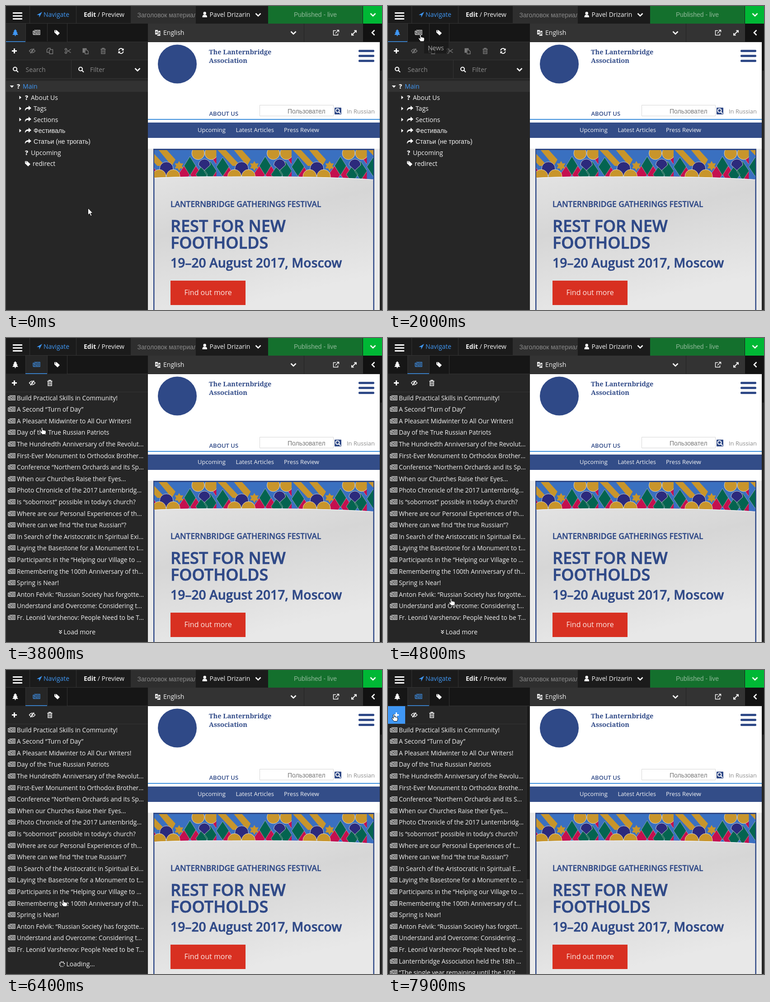
Write an HTML page that moves like this. It is 832 px wide and 673 px high and loops after 8000 ms.

```html
<!DOCTYPE html>
<html lang="en">
<head>
<meta charset="utf-8">
<title>Site editor</title>
<style>
html, body { margin: 0; width: 100%; height: 100%; overflow: hidden; background: #262626; }
svg { display: block; }
#stage, #over { position: absolute; left: 0; top: 0; }
text, #list { font: 14px 'Open Sans', sans-serif; }
text { fill: #f4f4f4; white-space: pre; }
.ar { font-family: 'Liberation Sans', Arial, sans-serif; }
.s13 { font-size: 13px; }
.navy { fill: #2f4987; }
.b { font-weight: 600; }
.q { font-weight: 800; }
.serif { font: 700 14.5px 'Noto Serif', serif; }
.head { font-weight: 600; stroke: #2f4987; stroke-width: .022em; }
.dim { fill: #8a8a8a; }
.blue { fill: #3f97f5; }
.w { color: #fff; }
.off { color: #7d7d7d; }
.on { color: #3f97f5; }
.ln { fill: none; stroke: currentColor; stroke-width: 1.4; }
.fl { fill: currentColor; }

#list { position: absolute; left: 0; top: 119.7px; width: 307px; height: 553.3px; margin: 0; padding: 0;
  overflow: hidden; list-style: none; color: #f4f4f4; font-size: 13.76px; line-height: 25.6px; }
#list li { position: relative; height: 25.6px; padding-left: 24px; overflow: hidden; white-space: nowrap; text-overflow: ellipsis; }
#list svg { position: absolute; left: 4px; top: 6px; color: #fff; }

.tree, .load, #list, .more, .hover, .load2, .rest, .plus, .news, .arrow, .hand, #cur, .tip {
  animation: 8s step-end infinite; }
.tree { animation-name: tree; }
.news { animation-name: news; }
.load { animation-name: load; }
#list { animation-name: list; }
.more { animation-name: more; }
.hover { animation-name: hover; }
.load2 { animation-name: load2; }
.rest { animation-name: rest; }
.plus { animation-name: plus; }
.arrow { animation-name: arrow; }
.hand { animation-name: hand; }
.tip { animation-name: tip; }
#cur { animation-name: move; }
.spin { animation: spin 2s steps(20) infinite; }

@keyframes tree { 0% { visibility: visible } 28.75%, 100% { visibility: hidden } }
@keyframes news { 0% { visibility: hidden } 28.75%, 100% { visibility: visible } }
@keyframes load { 0% { visibility: hidden } 28.75% { visibility: visible } 41.25%, 100% { visibility: hidden } }
@keyframes list { 0% { visibility: hidden; width: 307px } 41.25% { visibility: visible; width: 307px }
  81.25%, 100% { visibility: visible; width: 300px } }
@keyframes more { 0% { visibility: hidden } 41.25% { visibility: visible } 71.25%, 100% { visibility: hidden } }
@keyframes hover { 0% { visibility: hidden } 65% { visibility: visible } 71.25%, 100% { visibility: hidden } }
@keyframes load2 { 0% { visibility: hidden } 71.25% { visibility: visible } 81.25%, 100% { visibility: hidden } }
@keyframes rest { 0% { visibility: hidden } 81.25%, 100% { visibility: visible } }
@keyframes plus { 0% { visibility: hidden } 98.75%, 100% { visibility: visible } }
@keyframes arrow { 0% { visibility: visible } 16.25%, 100% { visibility: hidden } }
@keyframes hand { 0% { visibility: hidden } 16.25%, 100% { visibility: visible } }
@keyframes tip {
  0% { opacity: 0 }
  21.25% { opacity: 0; animation-timing-function: steps(5) }
  27.5% { opacity: 1 }
  28.75%, 100% { opacity: 0 } }
@keyframes move {
  0% { transform: translate(181px, 447px); animation-timing-function: steps(5) }
  6.25% { transform: translate(21px, 160px) }
  8.75% { transform: translate(21px, 160px); animation-timing-function: steps(4) }
  13.75% { transform: translate(14px, 112px); animation-timing-function: steps(5) }
  20% { transform: translate(59px, 63px); animation-timing-function: steps(3) }
  23.75% { transform: translate(67px, 62px) }
  32.5% { transform: translate(64px, 62px) }
  42.5% { transform: translate(64px, 64px); animation-timing-function: steps(2) }
  45% { transform: translate(52px, 112px); animation-timing-function: steps(2) }
  47.5% { transform: translate(75px, 197px); animation-timing-function: steps(2) }
  50% { transform: translate(89px, 333px) }
  52.5% { transform: translate(89px, 333px); animation-timing-function: steps(4) }
  57.5% { transform: translate(134px, 561px) }
  58.75% { transform: translate(134px, 561px); animation-timing-function: steps(6) }
  66.25% { transform: translate(138px, 649px) }
  68.75% { transform: translate(137px, 648px) }
  72.5% { transform: translate(137px, 648px); animation-timing-function: steps(5) }
  78.75% { transform: translate(122px, 507px) }
  88.75% { transform: translate(122px, 507px); animation-timing-function: steps(3) }
  92.5% { transform: translate(71px, 211px) }
  95% { transform: translate(71px, 211px); animation-timing-function: steps(3) }
  98.75%, 100% { transform: translate(8px, 97px) } }
@keyframes spin { to { transform: rotate(360deg) } }
</style>
</head>
<body>
<svg id="stage" width="832" height="673">
<defs>
  <linearGradient id="paper" x1="0" y1="0" x2=".3" y2="1">
    <stop offset="0" stop-color="#e8e8e8"/><stop offset=".5" stop-color="#d6d6d6"/><stop offset="1" stop-color="#e8e8e8"/>
  </linearGradient>
  <clipPath id="band"><path d="M328 319H813V384Q700 376 500 377.5Q400 376.5 328 380Z"/></clipPath>
  <clipPath id="field"><path d="M276 0H419V39H276Z"/></clipPath>

  <path id="i-plus" class="fl" d="M-1.500-5.500h3v4h4v3h-4v4h-3v-4h-4v-3h4z"/>
  <g id="i-eye"><path class="ln" d="M-6.500 0Q0-8 6.500 0Q0 8-6.500 0zM-4 5.500L4-5.500"/><circle class="fl" r="2"/></g>
  <path id="i-copy" class="ln" d="M-1 3h-5.500v-6l3-3h4.500v3M-1-1l2-2h5.500v9.300h-7.500z"/>
  <g id="i-cut" class="ln"><circle cx="-4" cy="-3.500" r="2"/><circle cx="-4" cy="3.500" r="2"/><path d="M-2.500-2.500L7 4M-2.500 2.500L7-4"/></g>
  <g id="i-paste"><path class="fl" d="M-6.500-6h9v3h-4.500v7h-4.500z"/><path class="ln" d="M-1-2h4l3 3v5.500h-7z"/></g>
  <path id="i-trash" class="ln" d="M-5.500-4h11M-2-4v-2h4v2M-4-4v10h8v-10M-1.500-2v6M1.500-2v6"/>
  <g id="i-sync"><path class="ln" style="stroke-width:2" d="M-5-1A5 5 0 0 1 4-3.500M5 1A5 5 0 0 1-4 3.500"/><path class="fl" d="M6-6v5h-5zM-6 6v-5h5z"/></g>
  <path id="i-find" class="ln" style="stroke-width:2" d="M3-1a4 4 0 1 1-8 0a4 4 0 1 1 8 0M2 2l4 4"/>
  <path id="i-down" class="ln" style="stroke-width:2.6" d="M-5.500-2.500L0 3L5.500-2.500"/>
  <path id="i-caret" class="fl" d="M-2-4l4.500 4-4.500 4z"/>
  <path id="i-share" class="fl" d="M-7 5.500Q-8-3 1-3V-6.500L7-1L1 4V.500Q-5 0-7 5.500z"/>
  <path id="i-tag" class="fl" fill-rule="evenodd" d="M-6-5.500h5l7 6.500-5 5-7-6.500zM-4.500-3.500a1 1 0 1 0 2 0a1 1 0 1 0-2 0"/>
  <path id="i-tree" class="fl" d="M0-7.500l4 4.500h-2l3.500 4h-2l3 4h-5.500v2.500h-2v-2.500h-5.500l3-4h-2l3.500-4h-2z"/>
  <path id="i-news" class="ln" style="stroke-width:1.1" d="M-5-5H7.500V5H-6Q-7.500 5-7.500 3.500V-3H-5V3.500Q-5 5-6.300 5M-3-3H1V1H-3zM2.500-3H6M2.500-1H6M2.500 1H6M-3 3H6"/>
  <g id="i-more" class="ln"><path d="M-3-4L0-1L3-4M-3 0L0 3L3 0"/></g>
  <g id="i-spin" class="fl">
    <circle cy="-5.200" r="1.400"/><circle cx="3.700" cy="-3.700" r=".8"/><circle cx="5.200" r="1"/><circle cx="3.700" cy="3.700" r="1.200"/>
    <circle cy="5.200" r="1.300"/><circle cx="-3.700" cy="3.700" r="1.400"/><circle cx="-5.200" r="1.400"/><circle cx="-3.700" cy="-3.700" r="1.500"/>
  </g>
  <g id="tile">
    <path fill="#3a70c0" d="M-84 318H83V386H-84z"/>
    <path fill="#c8952b" d="M-82 318h18l34 36h-18zM-46 318h18l20 22-8 14z"/>
    <g stroke="#cfcabf" stroke-width=".6">
      <path fill="#c4104f" d="M37 354l13 19-13 19-13-19zM11 354l13 19-13 19-13-19zM84 361l13 19-13 19-13-19zM-58 354l13 19-13 19-13-19zM82 316l12 17-12 17-12-17z"/>
      <path fill="#046450" d="M24 333l13 21-13 21-13-21zM50 354l13 19-13 19-13-19zM69 344l14 21-14 21-14-21zM-70 335l14 21-14 21-14-21z"/>
    </g>
    <g stroke="#efe9dc" stroke-width=".8">
      <circle cx="42" cy="326" r="14" fill="#c8952b"/><circle cx="71" cy="326" r="14" fill="#c8952b"/>
      <path fill="#2c2a7c" d="M43 352a13 13 0 0 1 26 0l-13 12z"/>
      <circle cx="-28" cy="360" r="15" fill="#2c2a7c"/>
      <circle cx="-44" cy="377" r="15" fill="#c8952b"/><circle cx="-13" cy="377" r="15" fill="#c8952b"/>
    </g>
    <path fill="#c8952b" transform="translate(0 354)" d="M0-11L3-5.500H9.500L6.300 0L9.500 5.500H3L0 11L-3 5.500H-9.500L-6.300 0L-9.500-5.500H-3Z"/>
  </g>
</defs>

<!-- top bar -->
<path fill="#1b1b1b" d="M0 0H832V39H0z"/>
<path fill="#2e2e2e" d="M276 0H420V39H276z"/>
<path fill="#14702d" d="M580 0H789V39H580z"/>
<path fill="#00b835" d="M790 0H832V39H790z"/>
<path stroke="#343434" d="M52.500 0V39M155.500 0V39M0 38.500H276"/>
<path fill="#fff" d="M15 14h21v3H15zM15 20.500h21v3H15zM15 27h21v3H15z"/>
<path class="blue" transform="translate(74 19)" d="M6-6L-6 1H-.500V6.500z"/>
<text class="blue" x="83" y="23.500">Navigate</text>
<text x="172" y="23.500"><tspan font-weight="700">Edit</tspan> / Preview</text>
<g clip-path="url(#field)"><text class="ar dim" x="290.500" y="24.500">Заголовок материала</text></g>
<path fill="#fff" d="M436.500 16a3.200 3.200 0 1 1 6.400 0a3.200 3.200 0 1 1-6.400 0M434.500 25q0-5 3-5.500h4.500q3 .5 3 5.500z"/>
<text x="450.500" y="23.500">Pavel Drizarin</text>
<text class="ar" x="637" y="24" style="fill:#8fb999">Published - live</text>
<g class="w"><use href="#i-down" x="558" y="19"/><use href="#i-down" x="812" y="19"/></g>

<!-- second bar -->
<path fill="#161616" d="M0 39H314V79H0z"/>
<path fill="#333" d="M314 39H832V79H314z"/>
<path fill="#121212" d="M790 39H832V79H790z"/>
<path stroke="#242424" d="M659.500 39V79"/>
<path fill="#eee" d="M330 53h6v10h-6zM337 55h4.500v11h-7v-2h2.500z"/>
<path fill="none" stroke="#333" d="M331.500 60l1.500-4 1.500 4M338 59h3M339.500 58v1q0 3-2 4M338 60l3 3"/>
<text x="348" y="64">English</text>
<g class="w">
  <use href="#i-down" x="636" y="59"/>
  <g class="ln"><path d="M730 54.500h-5.500v10h10v-4M729 60.500l7-7M732 53.500h4.500v4.500"/>
  <path stroke-width="1.800" d="M765.500 64l9-9M770.500 54.500h4.500v4.500M765 60v4.500h4.500"/>
  <path style="stroke-width:2.6" d="M815.500 53.500L810 59l5.500 5.500"/></g>
</g>

<!-- left panel -->
<path fill="#262626" d="M0 79H314V673H0z"/>
<g class="tree">
  <path fill="#262626" d="M0 39H43V79H0z"/>
  <path class="blue" d="M0 78H43v1.500H0z"/>
  <use class="on" href="#i-tree" x="20.500" y="59"/><use class="w" href="#i-news" x="67.500" y="58.500"/>
  <use class="w" href="#i-plus" x="18.500" y="99.500"/>
  <g class="off"><use href="#i-eye" x="58" y="99.500"/><use href="#i-copy" x="97" y="99.500"/><use href="#i-cut" x="136.500" y="99.500"/>
  <use href="#i-paste" x="176" y="99.500"/><use href="#i-trash" x="215" y="99.500"/></g>
  <use class="w" href="#i-sync" x="254.500" y="99.500"/>
  <path fill="#222" d="M0 120H314V160H0z"/>
  <path stroke="#363636" d="M0 160.500H314M144.500 120V160"/>
  <g class="w"><use href="#i-find" x="21" y="140.500"/><use href="#i-find" x="166" y="140.500"/><use href="#i-down" x="291" y="140.500"/></g>
  <text class="dim" x="43.500" y="145.500">Search</text><text class="dim" x="186" y="145.500">Filter</text>
  <path fill="#323232" d="M0 165.500H314V190H0z"/>
  <path fill="#fff" d="M8.500 176h9l-4.500 5z"/>
  <text class="q" x="24" y="183">?</text><text class="blue" x="37" y="183">Main</text>
  <g class="w"><use href="#i-caret" x="31.500" y="202.500"/><use href="#i-caret" x="31.500" y="227"/><use href="#i-caret" x="31.500" y="251.500"/><use href="#i-caret" x="31.500" y="276"/>
  <use href="#i-share" x="49" y="227"/><use href="#i-share" x="49" y="251.500"/><use href="#i-share" x="49" y="276"/><use href="#i-share" x="49" y="300"/>
  <use href="#i-tag" x="48" y="349"/></g>
  <text class="q" x="42" y="207.500">?</text><text x="55" y="207.500">About Us</text>
  <text x="61" y="232">Tags</text>
  <text x="61" y="256.500">Sections</text>
  <text class="ar" x="61" y="281">Фестиваль</text>
  <text class="ar" x="61" y="305">Статьи (не трогать)</text>
  <text class="q" x="42" y="329.500">?</text><text x="55" y="329.500">Upcoming</text>
  <text x="59" y="354">redirect</text>
</g>
<g class="news">
  <path fill="#262626" d="M43 39H91V79H43z"/>
  <path class="blue" d="M43 78H91v1.500H43z"/>
  <use class="w" href="#i-tree" x="20.500" y="59"/><use class="on" href="#i-news" x="67.500" y="58.500"/>
  <g class="w"><use href="#i-eye" x="58" y="99.500"/><use href="#i-trash" x="97" y="99.500"/></g>
</g>
<path class="plus blue" d="M0 80H38V119H0z"/>
<use class="news w" href="#i-plus" x="18.500" y="99.500"/>
<use class="w" href="#i-tag" x="113" y="59"/>
<path stroke="#343434" d="M43.500 39V78M91.500 39V78M135.500 39V79M135 79.500H314M0 119.500H314"/>
<g class="load w">
  <g transform="translate(124 139.500)"><use class="spin" href="#i-spin"/></g>
  <text x="133.500" y="144.500">Loading...</text>
</g>
<path class="hover blue" d="M0 631.500H314V671H0z"/>
<g class="more w"><use href="#i-more" x="120.500" y="651"/><text x="127.500" y="656">Load more</text></g>
<g class="load2 w">
  <g transform="translate(124 651.500)"><use class="spin" href="#i-spin"/></g>
  <text x="133.500" y="656">Loading...</text>
</g>
<g class="rest"><path fill="#303030" d="M306 80H314V673H306z"/><path fill="#1c1c1c" d="M307 80H313V463H307z"/></g>

<!-- page preview -->
<path fill="#fff" d="M314 80H827V316H314z"/>
<path fill="#e9e9e9" d="M314 316H827V673H314z"/>
<circle cx="379" cy="128.500" r="43" class="navy"/>
<text class="navy serif" x="449" y="107">The Lanternbridge</text>
<text class="navy serif" x="449" y="125.500">Association</text>
<g class="navy"><rect x="780" y="97" width="35" height="5" rx="2"/><rect x="780" y="108" width="35" height="5" rx="2"/><rect x="780" y="119" width="35" height="5" rx="2"/></g>
<text class="navy b s13" x="449.500" y="243">ABOUT US</text>
<path fill="#fff" stroke="#d6d6d6" d="M561.500 219.500H724.500V243.500H561.500z"/>
<text class="ar" x="623" y="238" style="fill:#777">Пользовател</text>
<rect x="727" y="225" width="15" height="15" rx="1" class="navy"/>
<use class="w" href="#i-find" x="734.500" y="232.500"/>
<text class="s13" x="754" y="238" style="fill:#8b8b8b">In Russian</text>
<path fill="#3d8fdc" d="M314 250H827v2H314z"/>
<path fill="#334d88" d="M314 258H827V292H314z"/>
<text class="s13" x="424" y="279">Upcoming</text><text class="s13" x="508.500" y="279">Latest Articles</text><text class="s13" x="615" y="279">Press Review</text>
<path fill="#2f4987" d="M326 316H815V673H326z"/>
<path fill="url(#paper)" d="M328.500 319H812.500V673H328.500z"/>
<g clip-path="url(#band)">
  <use href="#tile" x="216.500"/><use href="#tile" x="383"/><use href="#tile" x="549.500"/><use href="#tile" x="716"/><use href="#tile" x="882.500"/>
</g>
<path fill="none" stroke="#fff" d="M328.500 380.500Q400 377 500 378Q700 376.500 812.500 384.500"/>
<text class="navy head" x="364" y="445" style="font-size:17.4px">LANTERNBRIDGE GATHERINGS FESTIVAL</text>
<text class="navy head" x="364" y="500" style="font-size:36px">REST FOR NEW</text>
<text class="navy head" x="364" y="537" style="font-size:36px">FOOTHOLDS</text>
<text class="navy head" x="364" y="578.500" style="font-size:28.3px">19–20 August 2017, Moscow</text>
<path fill="#d83021" d="M364 608H530V662H364z"/>
<text x="394.500" y="640" style="font-size:16px;fill:#fbe6e2">Find out more</text>
<path fill="#262626" d="M827 79H832V673H827z"/>
<path fill="#111" d="M828 79H832V143H828z"/>
</svg>

<ul id="list"></ul>

<svg id="over" width="832" height="673">
  <g class="tip"><path fill="#141414" d="M80 80H134V105H80z"/><text x="88" y="97.500">News</text></g>
  <g id="cur" fill="#fff" stroke="#111" stroke-linejoin="round">
    <path class="arrow" d="M.500.500V15.500L4 12.500L6.500 18L9 17L6.500 11.500H11z"/>
    <path class="hand" d="M3 2.500Q4.500 0 6 2.500V6.500L11 7.500Q13.500 8 13.500 10V13L12 16.500H5L1 11Q0 9 1.500 8.500L4.300 10z"/>
  </g>
</svg>

<script>
const titles = [
  'Build Practical Skills in Community!',
  'A Second “Turn of Day”',
  'A Pleasant Midwinter to All Our Writers!',
  'Day of the True Russian Patriots',
  'The Hundredth Anniversary of the Revolution',
  'First-Ever Monument to Orthodox Brotherhoods',
  'Conference “Northern Orchards and its Spirit',
  'When our Churches Raise their Eyes...',
  'Photo Chronicle of the 2017 Lanternbridge Days',
  'Is “sobornost” possible in today’s church?',
  'Where are our Personal Experiences of the Past',
  'Where can we find “the true Russian”?',
  'In Search of the Aristocratic in Spiritual Existence',
  'Laying the Basestone for a Monument to the Past',
  'Participants in the “Helping our Village to Restore',
  'Remembering the 100th Anniversary of the Town',
  'Spring is Near!',
  'Anton Felvik: “Russian Society has forgotten itself',
  'Understand and Overcome: Considering the Past',
  'Fr. Leonid Varshenov: People Need to be Together',
  'Lanternbridge Association held the 18th Meeting',
  '“The single year remaining until the 100th year'
];
const icon = '<svg width="17" height="14"><use href="#i-news" x="8.5" y="6.5"/></svg>';
document.getElementById('list').innerHTML = titles
  .map((t, i) => `<li${i > 19 ? ' class="rest"' : ''}>${icon}${t}</li>`).join('');
</script>
</body>
</html>
```
